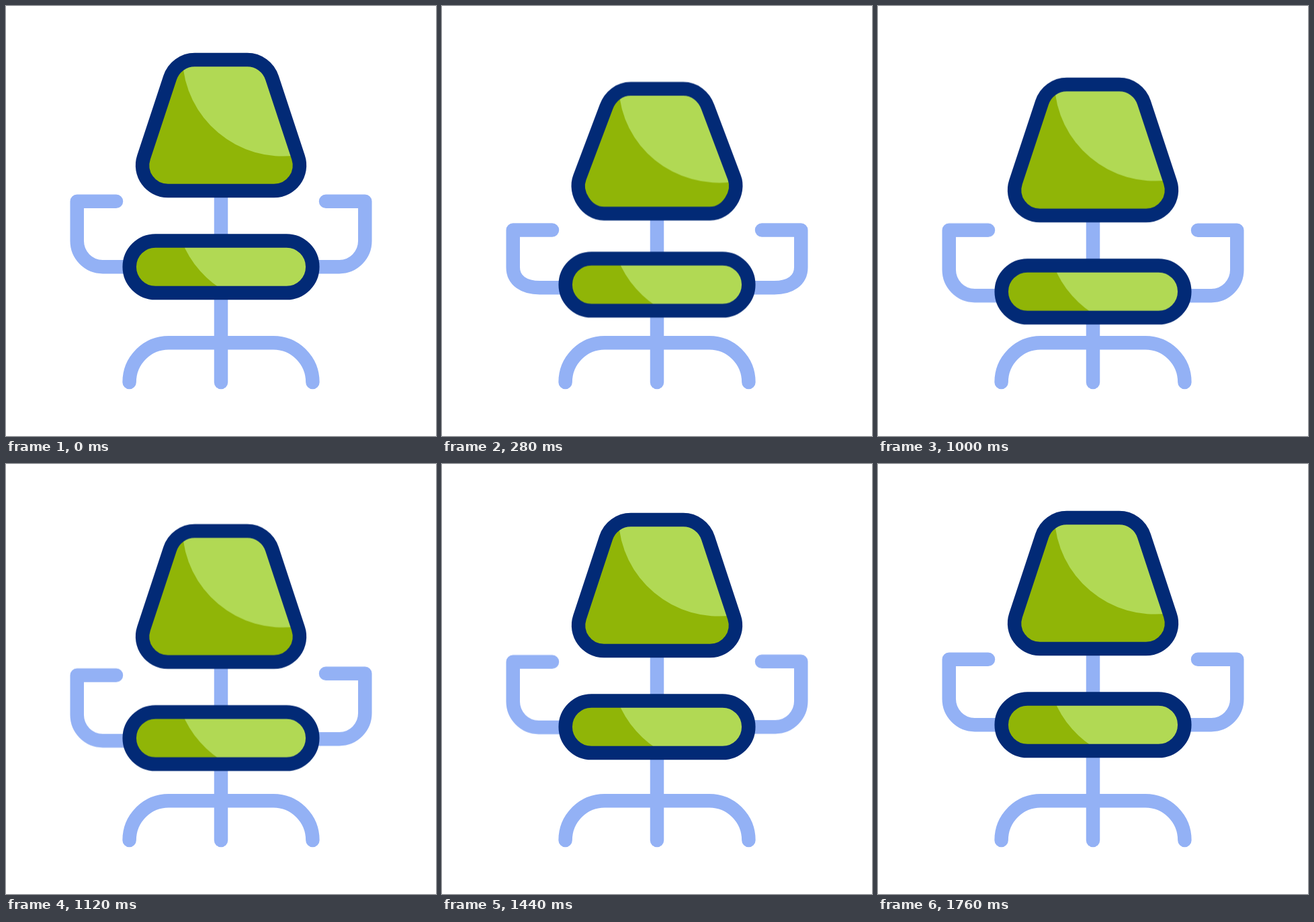
Recreate the animation shown at these times as an HTML page. Size 640 px wide and 640 px high, loop 2 s.

```html
<!DOCTYPE html>
<html lang="en">
<head>
<meta charset="utf-8">
<title>Office chair</title>
<style>
  html, body { margin: 0; width: 100%; height: 100%; overflow: hidden; background: #fff; }
  svg { display: block; width: 100vw; height: 100vh; }

  path, rect { stroke-width: 20.5; stroke-linecap: round; stroke-linejoin: round; }
  .frame { fill: none; stroke: #93b1f5; }
  .rim { fill: none; stroke: #022a76; }
  .shade { fill: #90b507; }
  .light { fill: #b1d954; }

  /* Sink quickly, wait, then rise with a long soft landing. */
  .move { animation: sink 2s infinite cubic-bezier(.16, 0, .055, 1); }
  .arm { --drop: 45px; }
  .body { --drop: 38.5px; }
  .left { animation-timing-function: cubic-bezier(.15, 0, .085, 1); }
  .right { animation-timing-function: cubic-bezier(.167, 0, 0, 1); }

  @keyframes sink {
    0% { transform: translateY(0); }
    4% { transform: translateY(0); animation-timing-function: cubic-bezier(.333, 0, .667, 1); }
    20%, 48% { transform: translateY(var(--drop)); }
    88%, 100% { transform: translateY(0); }
  }

  .squash { d: var(--rest); animation: squash 2s infinite cubic-bezier(.333, 0, .667, 1); }
  @keyframes squash {
    0%, 4%, 20%, 100% { d: var(--rest); }
    11% { d: var(--pressed); }
  }

  .armrest {
    --rest: path("M164 290.8H105.7V349.6C105.7 370.9 122.8 388.2 144 388.2H184");
    --pressed: path("M164 306.8H105.7V361C105.7 380 122 388.2 146 388.2H184");
  }
  .back {
    --rest: path("M281 80H359C375.9 80 390.8 90.9 396 107L435 225.2C443.1 249.8 424.9 275 399 275H241C215.1 275 196.9 249.8 205 225.2L244 107C249.2 90.9 264.1 80 281 80Z");
    --pressed: path("M281 103H359C376 103 389.5 114 395.5 130L435 229.7C444.3 252 425 285.3 399 285.3H241C215 285.3 195.7 252 205 229.7L244.5 130C250.5 114 264 103 281 103Z");
  }
  .gloss {
    --rest: path("M262.6 80A149.5 149.5 0 0 0 432 222.2L396 107C390.8 90.9 375.9 80 359 80Z");
    --pressed: path("M263.5 103A149.5 145 0 0 0 434 240L395.5 130C389.5 114 376 103 359 103Z");
  }
</style>
</head>
<body>
<svg viewBox="0 0 640 640" aria-label="Office chair">
  <path class="frame" d="M320 278V560"/>
  <path class="frame" d="M183.6 560A58.4 58.7 0 0 1 242 501.3H398A58.4 58.7 0 0 1 456.4 560"/>

  <g class="move arm left"><path class="frame armrest squash"/></g>
  <g class="move arm right">
    <g transform="translate(640 0) scale(-1 1)"><path class="frame armrest squash"/></g>
  </g>

  <g class="move body">
    <path class="shade back squash"/>
    <path class="light gloss squash"/>
    <path class="rim back squash"/>

    <rect class="shade" x="183.7" y="349.4" width="272.6" height="77.6" rx="38.8"/>
    <path class="light" d="M261.5 349.4A150 150 0 0 0 330 427H417.5A38.8 38.8 0 0 0 417.5 349.4Z"/>
    <rect class="rim" x="183.7" y="349.4" width="272.6" height="77.6" rx="38.8"/>
  </g>
</svg>
</body>
</html>
```
